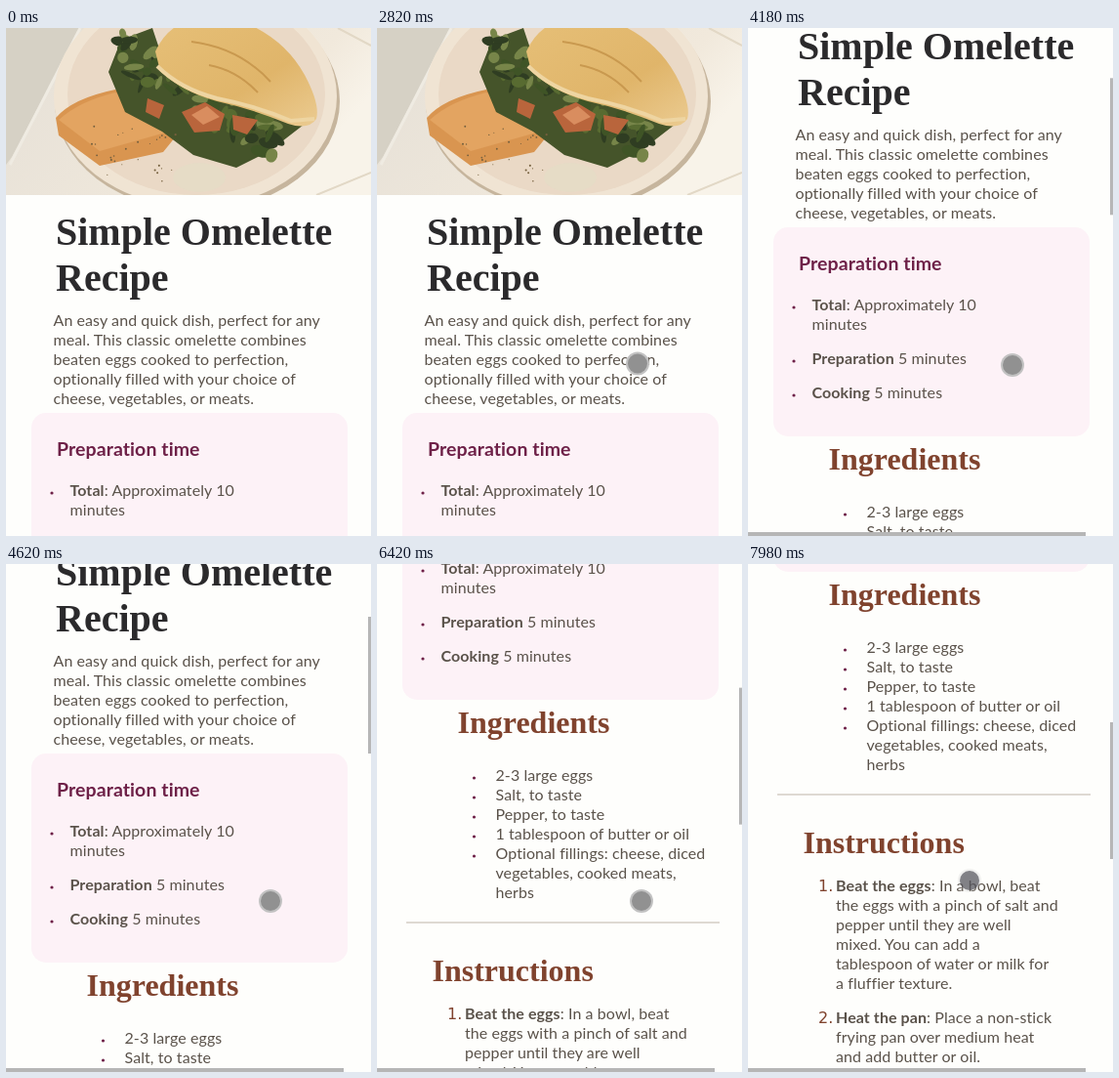
These frames come from a looping animation (374 px wide and 520 px high, 8 s). An HTML page:

```html
<!DOCTYPE html>
<html lang="en">
<head>
<meta charset="utf-8">
<title>Simple Omelette Recipe</title>
<style>
  html, body { margin: 0; width: 100%; height: 100%; overflow: hidden; background: #fefefc; }
  svg { display: block; }
  text { font: 16px Lato, sans-serif; letter-spacing: .08px; fill: #5a524a; white-space: pre; }
  .strong { font-weight: 700; }
  .title, .section { font: 700 40px "Liberation Serif", serif; letter-spacing: 0; fill: #2b2a2c; }
  .section { font-size: 32px; fill: #80432e; }
  .label { font-size: 19.5px; font-weight: 700; fill: #6e2148; }
  .number { font: 16px "DejaVu Sans", sans-serif; letter-spacing: 0; fill: #80432e; }
  .bullet { fill: #6e2148; }
</style>
</head>
<body>
<svg width="374" height="520" viewBox="0 0 374 520">
  <defs>
    <clipPath id="photoClip"><rect width="374" height="171"/></clipPath>
    <linearGradient id="table" x2="1" y2=".4">
      <stop offset="0" stop-color="#d9d5c8"/>
      <stop offset=".2" stop-color="#e8e2d8"/>
      <stop offset=".8" stop-color="#f1e9dc"/>
      <stop offset="1" stop-color="#f8f3e9"/>
    </linearGradient>
    <linearGradient id="egg" x2="1" y2="1">
      <stop offset="0" stop-color="#e6bf77"/>
      <stop offset=".6" stop-color="#e0b56a"/>
      <stop offset="1" stop-color="#ebcb91"/>
    </linearGradient>
  </defs>
  <g id="page">
    <g id="photo" clip-path="url(#photoClip)">
      <rect width="374" height="171" fill="url(#table)"/>
      <path d="M0 0H76L6 132L0 140Z" fill="#d6d1c5"/>
      <path d="M76 0L4 140" stroke="#efebe2" stroke-width="3"/>
      <path d="M340 0L374 18M318 171L374 148" stroke="#e2d8c6" stroke-width="2"/>
      <ellipse cx="196" cy="75" rx="146" ry="112" fill="#c6b59d"/>
      <ellipse cx="194" cy="70" rx="145" ry="113" fill="#f0e4d3"/>
      <ellipse cx="195" cy="68" rx="132" ry="103" fill="#ead9c6"/>
      <ellipse cx="198" cy="153" rx="27" ry="15" fill="#e6dcc6"/>
      <path d="M51 92Q68 72 112 63L148 78L178 106L161 127L96 141L77 127L54 110Z" fill="#d99550"/>
      <path d="M54 94Q75 75 112 66L145 82L167 106L96 126Z" fill="#e3a461"/>
      <path d="M105 45L118 12L150 0L164 42L218 70L305 99L270 126L236 143L192 130L160 106L122 86Z" fill="#45542a"/>
      <g id="leaves"></g>
      <path d="M180 86L204 76L224 88L219 105L193 107ZM145 72L162 79L157 93L143 86ZM232 89L258 94L247 109L233 104Z" fill="#b9653c"/>
      <path d="M190 89L206 80L219 91L202 99Z" fill="#d98d5f"/>
      <path d="M153 24Q162 4 180-5H246Q286 12 306 48Q322 78 318 93Q310 105 289 98Q253 83 216 75Q180 65 158 44Z" fill="url(#egg)"/>
      <path d="M155 39Q178 62 216 72Q257 80 292 95L316 93" fill="none" stroke="#eed5a2" stroke-width="4"/>
      <path d="M190 14Q239 20 271 55M208 38Q236 43 258 66" fill="none" stroke="#c9994f" stroke-width="2"/>
      <g id="pepper" fill="#75603e"></g>
    </g>
    <rect x="26" y="394" width="324" height="214" rx="15" fill="#fdf2f7"/>
    <path d="M30 836H351" stroke="#ded9d2" stroke-width="2"/>
    <g id="copy"></g>
  </g>
  <g id="bars" fill="#b6b6b6">
    <rect id="thumb" x="371" width="3" height="140"/>
    <rect y="516" width="346" height="4"/>
  </g>
  <g id="cursor">
    <circle id="ring" r="12" fill="#c2c2c2"/>
    <circle id="dot" r="10"/>
  </g>
</svg>
<script>
const $ = id => document.getElementById(id);
const LOOP = 8000;

function add(parent, name, attrs, html = "") {
  const node = document.createElementNS("http://www.w3.org/2000/svg", name);
  for (const key in attrs) node.setAttribute(key, attrs[key]);
  node.innerHTML = html;
  parent.append(node);
}

// Text rows by baseline; *word* marks bold.
function rows(x, y, lines, className = "", step = 20) {
  lines.forEach((line, i) => add($("copy"), "text", { x, y: y + i * step, class: className },
    line.replace(/\*(.+?)\*/g, '<tspan class="strong">$1</tspan>')));
}

function bullets(x, baselines) {
  for (const y of baselines) add($("copy"), "circle", { cx: x, cy: y - 3, r: 1.6, class: "bullet" });
}

let seed = 17;
const random = () => (seed = seed * 16807 % 2147483647) / 2147483647;

function garnish() {
  const greens = ["#2f3d22", "#586b31", "#778549", "#3f5426"];
  for (let i = 0; i < 65; i++) {
    const along = random();
    const x = 118 + along * 160, y = 25 + along * 90 + (random() - .5) * 42;
    add($("leaves"), "ellipse", {
      rx: 4 + random() * 8, ry: 2 + random() * 4, fill: greens[i % 4],
      transform: `translate(${x} ${y}) rotate(${random() * 180})`
    });
  }
  for (let i = 0; i < 28; i++)
    add($("pepper"), "circle", { cx: 85 + random() * 90, cy: 90 + random() * 68, r: .5 + random() * .6 });
}

function writeCopy() {
  rows(51, 222, ["Simple Omelette", "Recipe"], "title", 47);
  rows(48.5, 305, [
    "An easy and quick dish, perfect for any",
    "meal. This classic omelette combines",
    "beaten eggs cooked to perfection,",
    "optionally filled with your choice of",
    "cheese, vegetables, or meats."
  ]);
  rows(52, 438, ["Preparation time"], "label");
  rows(65.5, 479, ["*Total*: Approximately 10", "minutes"]);
  rows(65.5, 534, ["*Preparation* 5 minutes", "*Cooking* 5 minutes"], "", 35);
  bullets(47, [479, 534, 569]);
  rows(82.5, 642, ["Ingredients"], "section");
  rows(121.5, 691, [
    "2-3 large eggs", "Salt, to taste", "Pepper, to taste", "1 tablespoon of butter or oil",
    "Optional fillings: cheese, diced", "vegetables, cooked meats,", "herbs"
  ]);
  bullets(99.5, [691, 711, 731, 751, 771]);
  rows(56.5, 896, ["Instructions"], "section");
  rows(72, 935, ["1.", "2."], "number", 135);
  rows(90, 935, [
    "*Beat the eggs*: In a bowl, beat", "the eggs with a pinch of salt and",
    "pepper until they are well", "mixed. You can add a",
    "tablespoon of water or milk for", "a fluffier texture."
  ]);
  rows(90, 1070, [
    "*Heat the pan*: Place a non-stick", "frying pan over medium heat", "and add butter or oil."
  ]);
}

const smooth = p => p * p * (3 - 2 * p);
const progress = (t, from, length) => smooth(Math.min(1, Math.max(0, (t - from) / length)));

// Each wheel notch glides the page by a fixed distance.
const NOTCH = 100, GLIDE = 200;
const notches = [3375, 4020, 4780, 5600, 6295, 6950];
const scrollAt = t => notches.reduce((sum, from) => sum + NOTCH * progress(t, from, GLIDE), 0);

// Cursor moves: start, duration, dx, dy.
const moves = [[700, 700, -23, -182.5], [1800, 600, 50, -9], [3500, 300, 4, 1.5], [7450, 530, -44, -21]];
function cursorAt(t) {
  let x = 240, y = 535;
  for (const [from, length, dx, dy] of moves) {
    const p = progress(t, from, length);
    x += dx * p;
    y += dy * p;
  }
  return [x, y];
}

function draw(t) {
  const scroll = scrollAt(t);
  const settled = t >= 2400 && t < 7450;
  $("page").setAttribute("transform", `translate(0 ${-Math.round(scroll)})`);
  $("thumb").setAttribute("y", scroll * .27);
  $("bars").setAttribute("opacity", t >= notches[0] ? 1 : 0);
  $("cursor").setAttribute("transform", `translate(${cursorAt(t)})`);
  $("ring").setAttribute("opacity", settled ? 1 : .25);
  $("dot").setAttribute("fill", settled ? "#919191" : "#484850a8");
}

garnish();
writeCopy();
const start = performance.now();
function tick() {
  draw((performance.now() - start) % LOOP);
  requestAnimationFrame(tick);
}
tick();
</script>
</body>
</html>
```
